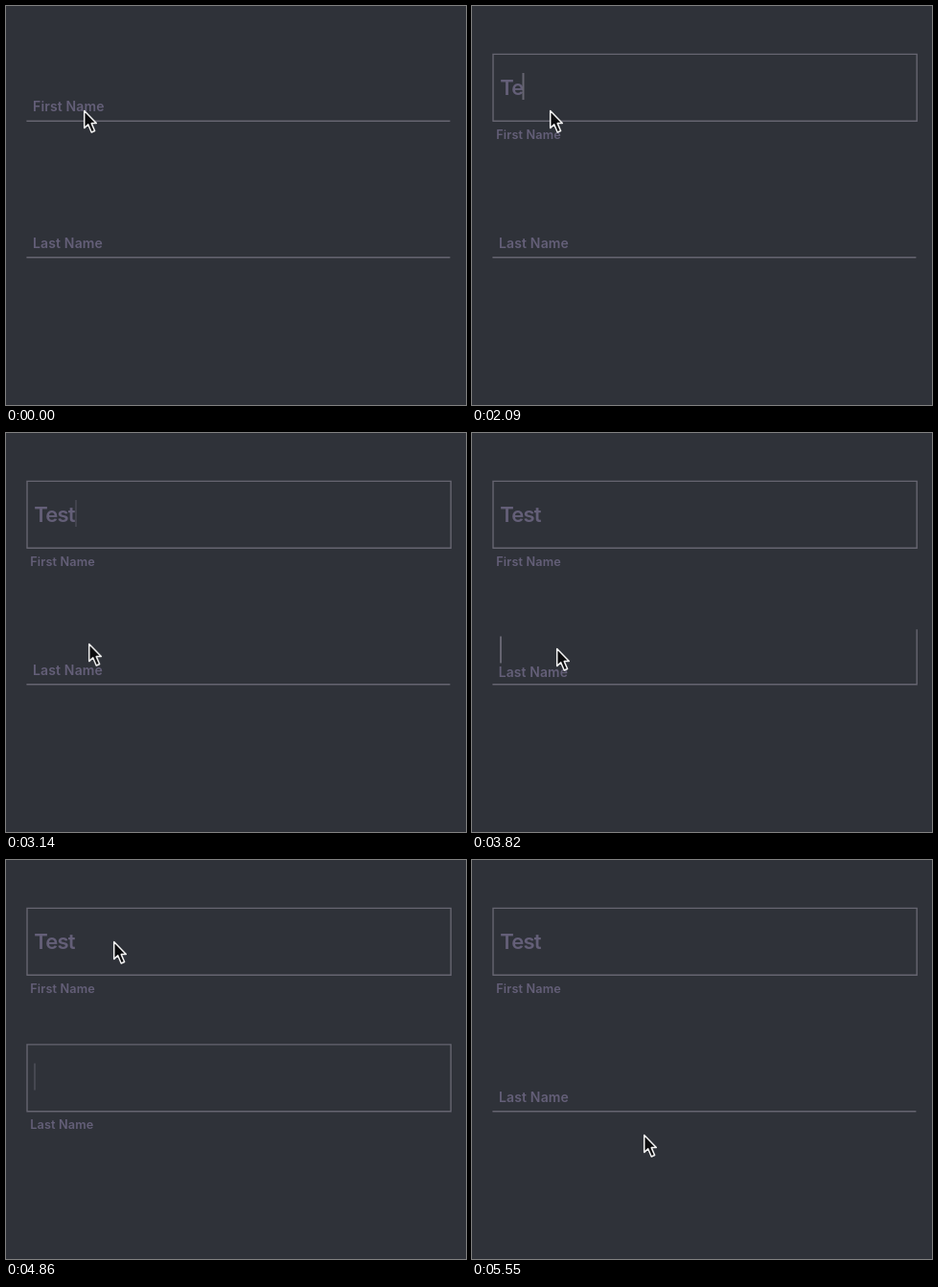
An HTML page for the animation above (5.6 s loop, 480 by 417 pixels).

```html
<!DOCTYPE html>
<html lang="en">
<head>
<meta charset="utf-8">
<title>Outlined form fields</title>
<style>
  @property --open { syntax: '<number>'; inherits: true; initial-value: 0; }

  :root { --ink: #645f78; --line: #666571; --loop: 5.6s; }
  html, body { margin: 0; width: 100%; height: 100%; overflow: hidden; background: #2f3239; }
  svg { display: block; width: 480px; height: 417px; }
  text { font-family: Inter, Roboto, sans-serif; font-weight: 600; fill: var(--ink); }

  /* --open runs from 0 (underline) to 1 (full outline, label below) */
  .field { animation: var(--loop) linear infinite; }
  .first { animation-name: open-first; }
  .last { animation-name: open-last; }
  .outline {
    fill: none; stroke: var(--line); stroke-width: 1.4;
    stroke-dasharray: 1025px;
    stroke-dashoffset: calc(583px * (1 - var(--open)));
  }
  .label {
    font-size: 14px; letter-spacing: .15px;
    transform:
      translate(calc(28px - 2.8px * var(--open)), calc(110px + 28.7px * var(--open)))
      scale(calc(1 - .093 * var(--open)));
  }
  @keyframes open-first {
    0%, 5.179% { --open: 0; animation-timing-function: ease; }
    10.536%, 100% { --open: 1; }
  }
  @keyframes open-last {
    0% { --open: 0; }
    67.679% { --open: 0; animation-timing-function: ease; }
    73.036% { --open: 1; }
    87.321% { --open: 1; animation-timing-function: ease; }
    92.5%, 100% { --open: 0; }
  }

  /* Typing */
  .value { font-size: 22px; letter-spacing: -.8px; }
  .value tspan { fill: transparent; animation: var(--loop) step-end infinite; }
  .value tspan:nth-child(1) { animation-name: type-1; }
  .value tspan:nth-child(2) { animation-name: type-2; }
  .value tspan:nth-child(3) { animation-name: type-3; }
  .value tspan:nth-child(4) { animation-name: type-4; }
  @keyframes type-1 { 34.73%, 100% { fill: var(--ink); } }
  @keyframes type-2 { 37.23%, 100% { fill: var(--ink); } }
  @keyframes type-3 { 42.05%, 100% { fill: var(--ink); } }
  @keyframes type-4 { 44.55%, 100% { fill: var(--ink); } }

  /* Carets: quick fades while blinking, hard changes on focus and blur */
  .caret { fill: var(--line); opacity: 0; }
  .first .caret {
    animation: blink-first var(--loop) linear infinite, advance var(--loop) step-end infinite;
  }
  .last .caret { animation: blink-last var(--loop) linear infinite; }
  @keyframes blink-first {
    0%, 5.5% { opacity: 0; }
    5.51%, 15.893% { opacity: 1; }
    17.857%, 23.929% { opacity: 0; }
    25.179%, 32.857% { opacity: 1; }
    34.72% { opacity: 0; }
    34.73%, 54.821% { opacity: 1; }
    56.786%, 63.75% { opacity: 0; }
    65%, 68% { opacity: 1; }
    68.01%, 87.7% { opacity: 0; }
    87.71%, 98.9% { opacity: 1; }
    98.91%, 100% { opacity: 0; }
  }
  @keyframes blink-last {
    0%, 68% { opacity: 0; }
    68.01%, 78.393% { opacity: 1; }
    80.357%, 86.161% { opacity: 0; }
    87.68% { opacity: 1; }
    87.69%, 100% { opacity: 0; }
  }
  @keyframes advance {
    0% { transform: none; }
    34.73% { transform: translateX(13px); }
    37.23% { transform: translateX(23.5px); }
    42.05% { transform: translateX(36px); }
    44.55%, 100% { transform: translateX(43px); }
  }

  .pointer {
    fill: #0c0c0e; stroke: #f4f4f4; stroke-width: 1.5; stroke-linejoin: round;
    animation: roam var(--loop) ease-in-out infinite;
  }
  @keyframes roam {
    0%, 50.357% { transform: translate(81px, 109px); }
    56.071% { transform: translate(86px, 220px); animation-timing-function: ease-out; }
    60%, 73.929% { transform: translate(88px, 225px); }
    79.464%, 94.286% { transform: translate(112px, 85px); }
    98.75%, 100% { transform: translate(179px, 287px); }
  }
</style>
</head>
<body>
<svg viewBox="0 0 480 417">
  <g class="field first">
    <path class="outline" d="M21.4 120.2H464.2V50.4H22V120.2"/>
    <text class="label">First Name</text>
    <text class="value" x="29.2" y="92.6"><tspan>T</tspan><tspan>e</tspan><tspan>s</tspan><tspan>t</tspan></text>
    <rect class="caret" x="29" y="70" width="2" height="28"/>
  </g>
  <g transform="translate(0 142.5)">
    <g class="field last">
      <path class="outline" d="M21.4 120.2H464.2V50.4H22V120.2"/>
      <text class="label">Last Name</text>
      <rect class="caret" x="29" y="70" width="2" height="28"/>
    </g>
  </g>
  <path class="pointer" d="M.7 .6V18.6L4.7 14.8L8.2 23L11.6 21.5L8.2 13.6H13.3Z"/>
</svg>
</body>
</html>
```
